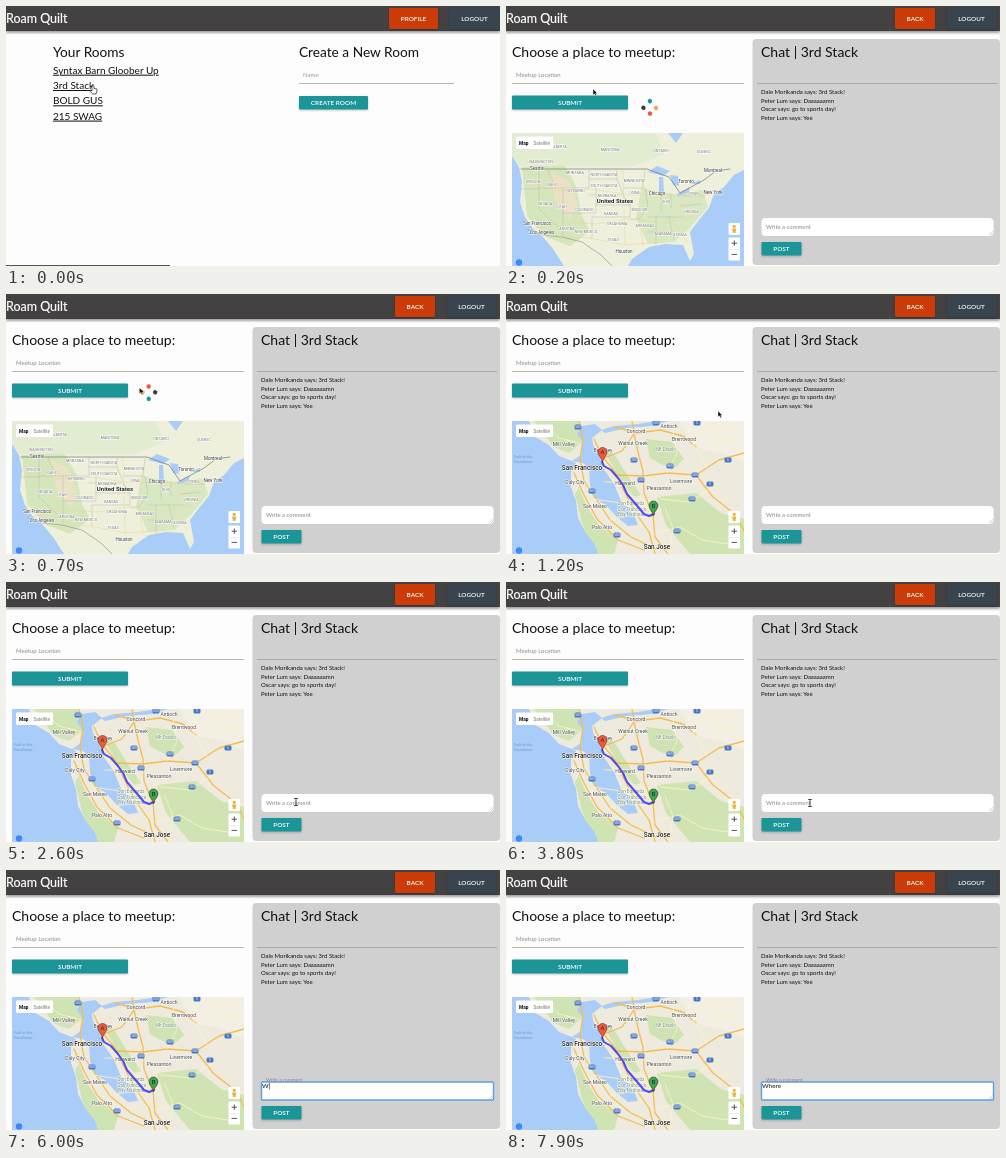
Write an HTML page that moves like this. It is 494 px wide and 260 px high and loops after 8 s.

```html
<!DOCTYPE html>
<html lang="en">
<head>
<meta charset="utf-8">
<title>Meetup rooms</title>
<style>
html, body { margin: 0; width: 100%; height: 100%; overflow: hidden; background: #fdfdfd; }
svg { display: block; width: 100vw; height: 100vh; font-family: Lato, sans-serif; }
.map { font-family: Roboto, sans-serif; }
.halo { paint-order: stroke; stroke: #fff; stroke-width: 1px; stroke-linejoin: round; }
</style>
</head>
<body>
<svg id="stage" viewBox="0 0 494 260" xmlns="http://www.w3.org/2000/svg"></svg>
<script>
const LOOP = 8000;
const ROOM_AT = 200, ROUTE_AT = 1000, FOCUS_AT = 3900, CURSOR_OFF = 4500;
const KEYS = [5700, 6500, 6750, 7000, 7250];
const MESSAGE = 'Where';
const TEAL = '#1b9597', ORANGE = '#cb3c08', SLATE = '#37454e';

const text = (x, y, size, str, fill = '#111', extra = '') =>
  `<text x="${x}" y="${y}" font-size="${size}" fill="${fill}" ${extra}>${str}</text>`;
const rect = (x, y, w, h, fill, extra = '') =>
  `<rect x="${x}" y="${y}" width="${w}" height="${h}" fill="${fill}" ${extra}/>`;
const path = (d, fill, stroke = 'none', width = 1) =>
  `<path d="${d}" fill="${fill}" stroke="${stroke}" stroke-width="${width}" stroke-linejoin="round" stroke-linecap="round"/>`;
const line = (x1, x2, y, color = '#999') => rect(x1, y, x2 - x1, .7, color);
const group = (id, body, extra = '') => `<g id="${id}" ${extra}>${body}</g>`;
const centered = (x, y, size, str, fill, extra = '') =>
  text(x, y, size, str, fill, `text-anchor="middle" ${extra}`);

function button(x, y, w, h, label, fill) {
  return rect(x, y + 1, w, h, '#000', 'rx="1" opacity=".22" filter="url(#soft)"') +
    rect(x, y, w, h, fill, 'rx="1"') +
    centered(x + w / 2, y + h / 2 + 2.3, 6.4, label, '#fff', 'font-weight="600"');
}

function header(buttons) {
  return rect(0, 2, 494, 25, '#000', 'opacity=".35" filter="url(#soft)"') +
    rect(0, 0, 494, 25, '#434142') +
    text(0, 16.5, 12.5, 'Roam Quilt', '#fff', 'stroke="#fff" stroke-width=".2"') + buttons;
}

function mapLabels(list, size, fill, weight = 400) {
  return list.map(([x, y, str]) =>
    centered(x, y, size, str, fill, `class="halo" font-weight="${weight}"`)).join('');
}

const lobby = header(button(383, 2, 49, 21, 'PROFILE', ORANGE) + button(443, 2, 51, 21, 'LOGOUT', SLATE)) +
  text(47, 51, 13.7, 'Your Rooms') +
  ['Syntax Barn Gloober Up', '3rd Stack', 'BOLD GUS', '215 SWAG'].map((name, i) =>
    text(47, 67.7 + i * 15.3, 10, name, '#111', 'text-decoration="underline"')).join('') +
  text(293, 51, 13.7, 'Create a New Room') +
  text(297, 71, 6, 'Name', '#999') + line(293, 448, 77) +
  button(293, 90, 69, 13.5, 'CREATE ROOM', TEAL) +
  rect(0, 259, 164, 1, '#555');

const countryMap = rect(6, 127, 232, 133, '#a9cdf8') +
  path('M6 127H238V164L228 169L218 181L208 188L203 202L193 214L184 226L188 248L184 255L177 239L160 238L143 241L126 253L122 260H58L47 243L37 231L27 223L19 211L14 196L16 176L13 161L6 150Z', '#eef0dc') +
  path('M16 161L58 158L70 180L76 210L84 225L64 240L40 231L21 210Z', '#d5e6bd') +
  path('M136 182L168 188L196 184L202 200L184 222L168 236L142 238L130 212Z', '#d8e8c2') +
  path('M6 127H150L158 148L128 160H14L6 150Z', '#e2ecd0') +
  path('M44 166L62 174L72 198L64 214L50 196Z', '#e9e2c5') +
  path('M142 166L151 160L164 165L157 170ZM153 171L157 171L158 186L153 188ZM164 169L172 170L173 180L167 179ZM171 188L184 181L183 186L172 191ZM183 178L194 174L194 178ZM162 127L170 137L177 127Z', '#a9cdf8') +
  path('M15 163H141L163 171L174 187L198 174L210 165L224 163', 'none', '#777', .7) +
  path('M22 224L37 229L56 231L76 236L95 249L106 260', 'none', '#888', .6) +
  path('M33 164V183H15M42 164L50 182H33V203L51 220M51 182H83V164M57 182V207H90V182M83 173H111V164M83 189H116M90 199H124V211H86V232M57 207V230M111 173L118 190L124 199M118 182H139L142 200L133 213H124M139 165L137 181M142 211H178M142 226H166M150 211V239M163 211L168 234M155 188V205M165 188V202M178 190H199M175 200L195 198', 'none', '#b9bba8', .5) +
  path('M17 177L48 185L85 183L125 189L153 188L187 190L205 188M29 222L58 216L91 218L124 213L158 217L188 211M39 229L84 232L119 239L160 236M117 165L119 239M137 174L132 205L137 240M178 190L167 216L181 236', 'none', '#efd58f', .5) +
  mapLabels([[35, 157, 'WASHINGTON'], [69, 168, 'MONTANA'], [98, 170, 'NORTH DAKOTA'], [27, 177, 'OREGON'],
    [46, 180, 'IDAHO'], [98, 181, 'SOUTH DAKOTA'], [70, 186, 'WYOMING'], [128, 176, 'MINNESOTA'],
    [101, 191, 'NEBRASKA'], [129, 188, 'IOWA'], [39, 199, 'NEVADA'], [56, 202, 'UTAH'], [78, 205, 'COLORADO'],
    [105, 209, 'KANSAS'], [134, 205, 'MISSOURI'], [111, 219, 'OKLAHOMA'], [61, 224, 'ARIZONA'],
    [80, 227, 'NEW MEXICO'], [107, 235, 'TEXAS'], [139, 221, 'ARKANSAS'], [157, 229, 'ALABAMA'],
    [173, 230, 'GEORGIA'], [188, 189, 'PENN'], [160, 197, 'OHIO'], [185, 207, 'VIRGINIA'],
    [155, 146, 'ONTARIO'], [198, 147, 'QUEBEC'], [53, 142, 'ALBERTA'], [104, 145, 'MANITOBA']], 3.7, '#777') +
  mapLabels([[31, 219, 'San Francisco'], [36, 228, 'Los Angeles'], [207, 188, 'New York'], [151, 189, 'Chicago'],
    [180, 177, 'Toronto'], [207, 166, 'Montreal'], [118, 247, 'Houston'], [31, 164, 'Seattle']], 4.5, '#333') +
  mapLabels([[109, 197, 'United States']], 6, '#222', 600);

const shields = [[72, 133], [150, 129], [191, 129], [128, 166], [164, 172], [189, 181], [135, 186], [222, 166],
  [186, 205], [86, 197], [111, 241], [171, 237], [204, 190]]
  .map(([x, y], i) => rect(x - 3.5, y - 2.5, 7, 5, '#4779c9', 'rx="1.5"') +
    centered(x, y + 1.3, 3.3, [580, 680, 5, 280, 880][i % 5], '#fff')).join('');

function pin(x, y, fill, letter) {
  return path(`M${x} ${y}C${x - 1} ${y - 5} ${x - 4.5} ${y - 6} ${x - 4.5} ${y - 10}A4.5 4.5 0 0 1 ${x + 4.5} ${y - 10}C${x + 4.5} ${y - 6} ${x + 1} ${y - 5} ${x} ${y}Z`, fill, '#5a3023', .6) +
    centered(x, y - 7.7, 6, letter, '#222');
}

const bayMap = rect(6, 127, 232, 133, '#eeeade') +
  path('M28 127H72L76 148L63 159L47 153L38 139ZM96 153L109 161L121 181L135 201L128 203L113 184ZM140 145L166 148L178 165L166 176L144 164ZM151 203L190 199L215 219L238 225V260H184L160 231ZM73 194L83 216L93 231L112 246L108 260H91L76 230L69 200Z', '#cfe3b3') +
  path('M172 127H238V169L214 158L190 154Z', '#f3efe3') +
  path('M6 127H23L29 143L43 151L53 162L66 167L70 169L65 178L65 193L70 207L72 224L80 239L89 251L92 260H6Z', '#a9cdf8') +
  path('M66 167L75 161L77 148L71 140L76 132L89 130L96 136L86 144L87 151L93 159L97 174L108 190L115 207L128 221L132 231L122 232L110 222L100 211L88 204L84 191L83 174L77 169Z', '#a9cdf8') +
  path('M95 136L108 132L132 130L151 127H162L147 132L121 134L99 139Z', '#a9cdf8') +
  path('M73 127L77 145L74 165L78 187L92 208L104 226L125 243L150 255M88 145L96 162L109 178L117 195L129 218L143 238L149 260M98 164L116 157L128 140L126 127M128 140L132 158L137 177L138 199L147 221L149 243L162 260M111 181L137 182L161 179L190 181L213 166L238 159M109 133L131 139L154 136L177 142L190 153M190 181L207 203L231 222L238 237M68 179L78 201L91 225L112 246L138 256', 'none', '#f4bd50', 1.3) +
  path('M40 132L53 144L73 149M137 190L155 205L184 208L213 189M161 179L171 159L167 138M190 127L187 150L201 174M99 188L119 188M87 205L115 209L135 205M104 226L120 222L139 218M149 240L174 233L196 246L228 251M207 127L209 148L238 144M159 214L167 234L163 260', 'none', '#fff5bf', .8) + shields +
  mapLabels([[130, 139, 'Concord'], [163, 134, 'Antioch'], [127, 151, 'Walnut Creek'], [178, 147, 'Brentwood'],
    [58, 152, 'Mill Valley'], [97, 158, 'Berkeley'], [69, 190, 'Daly City'], [89, 214, 'San Mateo'],
    [153, 196, 'Pleasanton'], [96, 235, 'Palo Alto'], [119, 191, 'Hayward'], [175, 189, 'Livermore']], 5, '#444') +
  mapLabels([[160, 157, 'Mt Diablo'], [125, 211, 'Don Edwards'], [126, 216.5, 'San Francisco'],
    [125, 222, 'Bay National']], 4.6, '#65866a') +
  mapLabels([[76, 176, 'San Francisco'], [151, 255, 'San Jose']], 6.4, '#222', 500) +
  text(8, 164, 4, 'Gulf of the', '#6b96cb') + text(8, 169, 4, 'Farallones', '#6b96cb') +
  path('M96 168L98 172L105 176L112 184L117 191L121 200L127 207L133 214L138 220L143 222L148 220', 'none', '#514be9', 2) +
  pin(96.5, 168, '#ee5a3a', 'A') + pin(147.5, 221.5, '#36a94c', 'B');

const controls = rect(10, 130.5, 37, 12.5, '#fff', 'rx="1"') +
  text(13, 138.6, 4.8, 'Map', '#111', 'font-weight="700"') + text(27.5, 138.6, 4.6, 'Satellite', '#777') +
  rect(222.5, 217, 11.5, 12, '#fff', 'rx="1"') +
  '<circle cx="228.2" cy="220.3" r="1.6" fill="#edb33c"/>' + path('M226 222.5H230.4L229.5 227H227Z', '#edb33c') +
  rect(222.5, 231.5, 11.5, 23, '#fff', 'rx="1"') + rect(224, 243, 8.5, .5, '#ddd') +
  path('M226 237.2H230.6M228.3 234.9V239.5M226 248.4H230.6', 'none', '#555', 1) +
  '<circle cx="13" cy="256.5" r="3.2" fill="#4285f4"/>';

const dots = [[-3.5, -5, '#303c48'], [4.8, -1, '#159a9b'], [-7, 3, '#e9573f'], [.3, 7, '#f3a552']]
  .map(([x, y, fill]) => `<circle cx="${x}" cy="${y}" r="2.2" fill="${fill}"/>`).join('');

const room = header(button(389, 2, 40, 21, 'BACK', ORANGE) + button(441, 2, 49, 21, 'LOGOUT', SLATE)) +
  text(6, 51, 14, 'Choose a place to meetup:') +
  text(10, 71, 6, 'Meetup Location', '#888') + line(6, 238, 77) +
  button(6, 89.5, 116, 14, 'SUBMIT', TEAL) + group('spinner', dots) +
  group('mapArea', group('country', countryMap) + group('bay', bayMap) + controls, 'class="map" clip-path="url(#mapClip)"') +
  rect(246.5, 33, 247.5, 226, '#d0d0d0', 'rx="4"') +
  text(255, 51, 14, 'Chat | 3rd Stack') + line(251, 491, 77) +
  ['Dale Morikanda says: 3rd Stack!', 'Peter Lum says: Daaaaaamn', 'Oscar says: go to sports day!', 'Peter Lum says: Yee']
    .map((str, i) => text(255, 88 + i * 8.6, 6, str)).join('') +
  rect(255.5, 212, 232, 18, '#fff', 'id="box"') +
  path('M483 229L486.5 225.5M485 229L486.5 227.5', 'none', '#aaa', .5) +
  text(260, 223, 5.9, 'Write a comment', '#888', 'id="hint"') +
  text(256, 218.3, 6.4, '', '#111', 'id="typed"') + rect(256, 213, .6, 6.5, '#222', 'id="caret"') +
  button(255.5, 236, 40, 13.5, 'POST', TEAL);

const cursors =
  group('arrow', path('M0 0V6L1.5 4.8L2.6 7L3.6 6.5L2.6 4.4H4.4Z', '#111', '#fff', .4)) +
  group('hand', path('M-1 -3V2L-2.5 1L-3 2L-.5 5H3L4 1.5V0L1 -.6V-3Q0 -4 -1 -3Z', '#fff', '#222', .7)) +
  group('beam', path('M-1.5 -3.5H1.5M0 -3.5V3.5M-1.5 3.5H1.5', 'none', '#222', .8));

const stage = document.getElementById('stage');
stage.innerHTML = `<defs>
  <filter id="soft" x="-20%" y="-50%" width="140%" height="200%"><feGaussianBlur stdDeviation="1"/></filter>
  <clipPath id="mapClip"><rect x="6" y="127" width="232" height="133"/></clipPath></defs>` +
  rect(0, 0, 494, 260, '#fdfdfd') + group('lobby', lobby) + group('room', room) + group('cursor', cursors);

const el = Object.fromEntries([...stage.querySelectorAll('[id]')].map(node => [node.id, node]));
const show = (node, on) => node.setAttribute('display', on ? 'inline' : 'none');
const set = (node, attrs) => Object.entries(attrs).forEach(([key, value]) => node.setAttribute(key, value));
const ease = p => p * p * (3 - 2 * p);
const clamp = p => Math.max(0, Math.min(1, p));

const pointer = [[0, 87, 83], [200, 87, 83], [400, 97, 81], [800, 140, 96], [1200, 212, 117],
  [1500, 216, 121], [2200, 290, 220], [2800, 290, 220], [3400, 304, 221], [LOOP, 304, 221]];

function pointerAt(t) {
  const i = pointer.findIndex(([time]) => time > t);
  const [t0, x0, y0] = pointer[i - 1], [t1, x1, y1] = pointer[i];
  const p = ease((t - t0) / (t1 - t0));
  return [x0 + (x1 - x0) * p, y0 + (y1 - y0) * p];
}

function render(t) {
  const inRoom = t >= ROOM_AT, routed = t >= ROUTE_AT, focused = t >= FOCUS_AT;
  show(el.lobby, !inRoom);
  show(el.room, inRoom);
  show(el.country, !routed);
  show(el.bay, routed);
  show(el.spinner, !routed);
  set(el.spinner, { transform: `translate(143.3 100) rotate(${(t - 400) * .36})` });

  const lift = ease(clamp((t - FOCUS_AT) / 200));
  set(el.hint, { y: 223 - 11 * lift, 'font-size': 5.9 - 1.1 * lift });
  set(el.box, { rx: focused ? 1 : 4, stroke: focused ? '#5aa2e6' : 'none', 'stroke-width': 1.4 });

  const count = KEYS.filter(key => t >= key).length;
  el.typed.textContent = MESSAGE.slice(0, count);
  const sinceInput = t - (count ? KEYS[count - 1] : FOCUS_AT);
  show(el.caret, focused && sinceInput % 1000 < 500);
  set(el.caret, { x: 256.3 + (count ? el.typed.getComputedTextLength() : 0) });

  const [x, y] = pointerAt(t);
  const overBox = x > 256 && y > 212;
  show(el.cursor, t < CURSOR_OFF);
  show(el.hand, !inRoom);
  show(el.beam, inRoom && overBox);
  show(el.arrow, inRoom && !overBox);
  set(el.cursor, { transform: `translate(${x} ${y})` });
}

const start = performance.now();
function frame() {
  render((performance.now() - start) % LOOP);
  requestAnimationFrame(frame);
}
frame();
</script>
</body>
</html>
```
